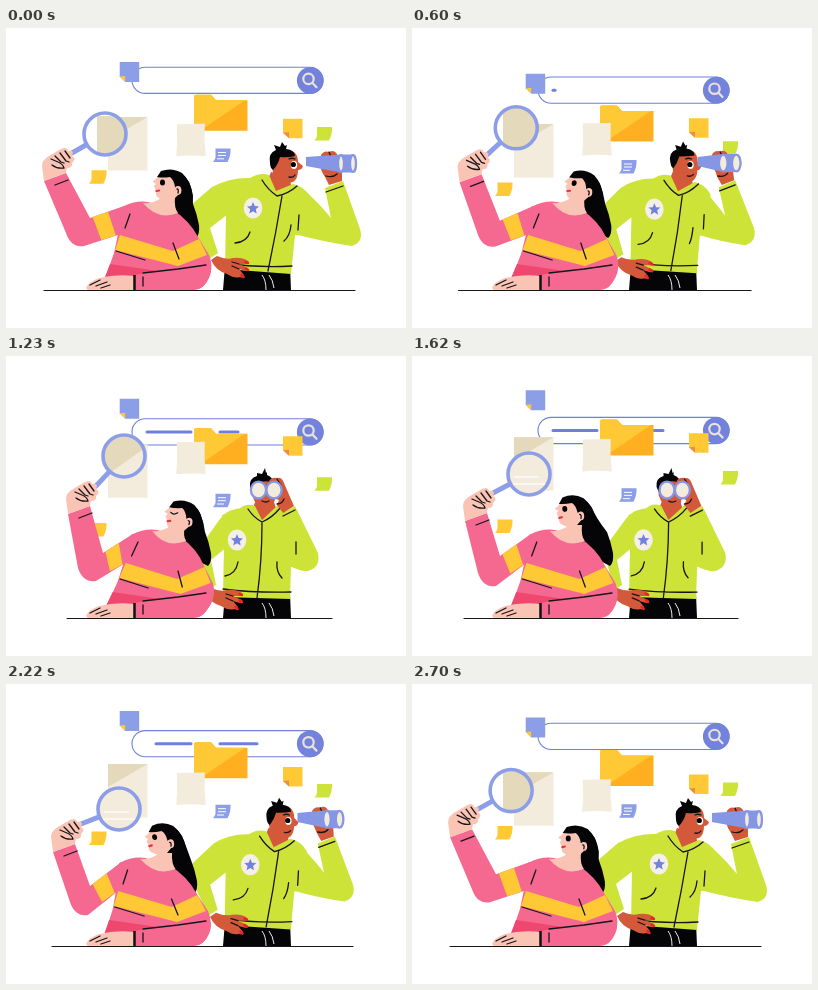
These frames come from a looping animation (400 by 300 pixels, 2730 ms). An HTML page:

```html
<!DOCTYPE html>
<html lang="en">
<head>
<meta charset="utf-8">
<title>Search together</title>
<style>
html,body{margin:0;width:100%;height:100%;overflow:hidden;background:#fff}
svg{display:block;width:100vw;height:100vh}
.ink{fill:none;stroke:#17151a;stroke-width:1.3;stroke-linecap:round;stroke-linejoin:round}
.black{fill:#050507}
.pink{fill:#f5688f}
.sun{fill:#ffc936}
.lime{fill:#cde338}
.pale{fill:#fac4b5}
.brown{fill:#d4593a}
.cream{fill:#f3ebdc}
.tan{fill:#e5d9bb}
.blue{fill:#8d9ee8}
.line{fill:none;stroke:#6f80db}
</style>
</head>
<body>
<svg viewBox="0 0 400 300">
<defs>
  <clipPath id="clip"><circle id="clipRing" r="21"/></clipPath>
  <path id="tag" d="M2.5 0H17.5Q18 7 14.5 13.5H0Q3 10 2.5 7Z"/>
</defs>

<g id="bar">
  <rect class="line" x="126" y="-13.2" width="191" height="26.2" rx="13.1" stroke-width="1.1"/>
  <path id="dash1" class="line" stroke-width="3" stroke-linecap="round"/>
  <path id="dash2" class="line" stroke-width="3" stroke-linecap="round"/>
  <circle cx="304.3" r="13.4" fill="#7383dc"/>
  <g fill="none" stroke="#e9e1dc" stroke-width="2.2" stroke-linecap="round"><circle cx="302.5" cy="-1.5" r="5.2"/><path d="M306.5 2.6L310.5 6.8"/></g>
</g>
<g id="memo"><path class="blue" d="M0 0H19.5V20H5.5L0 14.5Z"/><path class="sun" d="M0 14.5L5.5 14V20Z"/></g>
<g id="sheet"><path class="cream" d="M0 0H39.5V53.5H0Z"/><path class="tan" d="M0 0H39.5L0 23Z"/></g>
<g id="folder"><path fill="#ffaf1f" d="M0 2Q0 0 2 0H17L22 5.5H53.5V36H0Z"/><path class="sun" d="M0 2Q0 0 2 0H17L22 5.5H51L6 36H0Z"/></g>
<path id="slip" class="cream" d="M.5 .5L28.5 0Q27.5 16 29.5 32.5Q15 31 0 32.5Q1.5 16 .5 .5Z"/>
<g id="sticky"><path class="sun" d="M0 0H19.5V19.5H6L0 14Z"/><path fill="#f08a4b" d="M0 14L6 13.5V19.5Z"/></g>
<g id="tagGreen"><use href="#tag" class="lime"/></g>
<g id="tagBlue"><use href="#tag" class="blue"/><path d="M5 4H13M5 7H13M4 10.3H11" stroke="#fff" fill="none"/></g>
<g id="tagSun"><use href="#tag" class="sun"/></g>

<g id="man">
  <path class="black" d="M219 238H284L285 262H217Z"/>
  <path d="M256 247Q260 252 260 262M263 247Q267 252 268 260" stroke="#eee" fill="none"/>
  <path id="neck" class="brown"/>
  <path id="sleeve" class="lime"/>
  <path id="jacket" class="lime"/>
  <path id="arm" class="lime"/>
  <path id="seams" class="ink"/>
  <path id="face" class="brown"/>
  <path id="crop" class="black"/>
  <g id="look"><ellipse cx="288" cy="137" rx="3.2" ry="4" fill="#fff"/><circle cx="287.3" cy="136.5" r="2.6"/><path class="ink" d="M283 131Q286 129.5 289 131"/></g>
  <path id="smile" class="ink"/>
  <g id="badge"><ellipse rx="9.3" ry="10.6" fill="#f4efe9"/><path fill="#7182dc" d="M0-6L1.7-2L6-1.6L2.8 1.2L3.7 5.5L0 3.2L-3.7 5.5L-2.8 1.2L-6-1.6L-1.7-2Z"/></g>
  <path id="grip" class="brown"/>
  <path id="gripInk" class="ink"/>
  <path id="tube" fill="#8496e4"/>
  <g class="cream" stroke="#8496e4" stroke-width="2.3"><ellipse id="eyeA" ry="8.4"/><ellipse id="eyeB" ry="8.4"/></g>
  <g id="hip"><path class="brown" d="M205 232L211 228Q220 232 227 230Q236 229 242 233Q244 235 240 236L233 236L242 240Q244 243 240 243L233 241L238 247Q238 251 234 249Q229 251 221 246Q210 243 205 232Z"/><path class="ink" d="M226 234L233 236M226 238L233 241"/><path d="M239.5 234L242 235M239.5 240.5L242 242M235.5 247L237.5 249" stroke="#ef1f2d" stroke-width="2.5" stroke-linecap="round"/></g>
</g>

<g id="woman">
  <path id="hair" class="black"/>
  <path id="foreArm" class="pink"/>
  <path id="band" class="sun"/>
  <path id="cuff" class="ink"/>
  <g id="body">
    <path class="pink" d="M116 179Q130 172 142 174L166 181Q184 193 192 209L203 227Q209 242 200 254Q196 262 186 262H96L100 248L108 225L112 206Z"/>
    <path class="sun" d="M114 207L167 223L193 211L201 227L172 238L109 222Z"/>
    <path fill="#f0476f" d="M104 236L152 243L128 249L99 249Z"/>
    <path class="ink" d="M110 223L139 232M167 215L173 231M124 186L119 200"/>
    <path class="pale" d="M137 175Q148 176 156 169L169 169Q168 180 172 185Q152 193 137 175Z"/>
  </g>
  <path class="pink" d="M129 247L200 233Q208 238 203 250Q198 262 187 262H129Z"/>
  <path class="ink" d="M137 245L172 241L200 237M137 249V258"/>
  <path class="pale" d="M80 260Q82 254 93 250Q110 246 128 248V262H82Z"/>
  <path class="ink" d="M90 258L101 254M95 260L104 257M84 257L94 252"/>
  <path d="M128.5 247V262" stroke="#111" stroke-width="2.5"/>
  <g id="head">
    <path class="pale" d="M153 147L170 147L176 163L167 172Q161 175 153 170Q149 168 150 163L148 158L150 156L146.5 153.5Q151 151 153 147Z"/>
    <path class="black" d="M151 149L155 143Q166 139 176 145Q185 153 187 168L186 176Q178 174 174 167L169 159Q168 152 164 149Q157 150 151 149Z"/>
    <ellipse class="pale" cx="172" cy="162.5" rx="3.4" ry="4.4"/>
    <path class="ink" d="M171 161Q173 161 172 165"/>
    <g id="eyeOpen"><ellipse cx="156.5" cy="154.5" rx="2.5" ry="2.9"/></g>
    <path id="eyeShut" class="ink" d="M153 154Q156 157 160 154"/>
    <path d="M150.5 163L153 162.5" stroke="#e5324a" stroke-width="2.2" stroke-linecap="round"/>
  </g>
</g>

<g clip-path="url(#clip)">
  <circle id="glass" r="21" fill="#fff"/>
  <path id="zoom" class="cream"/>
  <path id="zoomTan" class="tan"/>
  <path id="zoomLine" stroke="#fff" stroke-width="1.6" fill="none"/>
</g>
<circle id="ring" r="21" fill="none" stroke="#8d9ee8" stroke-width="3.6"/>
<path id="handle" stroke="#8d9ee8" stroke-width="5" stroke-linecap="round"/>
<g id="fist">
  <path class="pale" d="M-11 4L-13-11Q-13-17-6-21L6-28Q12-31 13-26Q20-27 17-21Q22-18 17-14Q18-9 12-9Q11-6 11-4Z"/>
  <path class="ink" d="M-4-18L3-15Q8-13 9-9M0-21L6-15L9-14M5-24L11-16L14-15M10-26L15-19M-3-12Q2-8 9-9"/>
</g>
<path id="floor" class="ink" style="stroke-width:1.1"/>
</svg>
<script>
const LOOP = 2730, TIMES = [0, 390, 570, 810, 1230, 1620, 2220];
const $ = id => document.getElementById(id);
const set = (id, attrs) => { for (const k in attrs) $(id).setAttribute(k, attrs[k]); };
const path = (id, d) => set(id, { d });
const move = (id, x, y, extra = '') => set(id, { transform: `translate(${x} ${y}) ${extra}` });
const lerp = (a, b, k) => a + (b - a) * k;
const ramp = (t, a, b) => Math.min(1, Math.max(0, (t - a) / (b - a)));

// Blend two paths that share one structure.
function mix(a, b, k) {
  const nums = b.match(/-?[\d.]+/g);
  let i = 0;
  return a.replace(/-?[\d.]+/g, n => lerp(+n, +nums[i++], k).toFixed(2));
}

// Cyclic monotone cubic through the pose values.
function pose(t, v) {
  const n = v.length, at = i => TIMES[(i + n) % n] + LOOP * Math.floor(i / n);
  const slope = i => (v[(i + 1 + n) % n] - v[(i + n) % n]) / (at(i + 1) - at(i));
  const tan = i => {
    const a = slope(i - 1), b = slope(i);
    return a * b <= 0 ? 0 : 2 * a * b / (a + b);
  };
  let i = n - 1;
  while (TIMES[i] > t) i--;
  const h = at(i + 1) - at(i), s = (t - at(i)) / h, r = 1 - s;
  return v[i] * r * r * (1 + 2 * s) + tan(i) * h * s * r * r
    + v[(i + 1) % n] * s * s * (3 - 2 * s) - tan(i + 1) * h * s * s * r;
}

function drawPapers(t) {
  const wave = (mid, amp, phase) => mid + amp * Math.cos(2 * Math.PI * (t / LOOP - phase));
  move('bar', 0, wave(64.5, 12.1, .5));
  move('memo', 113.7, wave(37, 10, .297));
  move('sheet', 102, wave(87.3, 8.8, .22));
  move('slip', 170.3, wave(90, 7, .1));
  move('folder', 188, wave(68, 10, .27));
  move('sticky', 277, wave(84.7, 7.5, .1));
  move('tagGreen', 308.5, wave(109.5, 12, .42));
  move('tagBlue', 207, wave(128.5, 9.5, .41));
  move('tagSun', 83, wave(154.5, 12.5, .47));
  const dash = (id, x, w, on, off) => {
    const a = x + w * ramp(t, ...off), b = x + w * ramp(t, ...on);
    path(id, b - a > .5 ? `M${a + 1} 0H${b}` : 'M0 0');
  };
  dash('dash1', 140, 45, [570, 1020], [2130, 2580]);
  dash('dash2', 213, 38, [1050, 1410], [2340, 2640]);
}

function drawMan(t) {
  const m = pose(t, [0, .09, .24, .77, 1, .97, .17]);
  const morph = (id, a, b) => path(id, mix(a, b, m));
  morph('neck', 'M265 144L284 150L286 164L270 170L260 156Z', 'M250 144L268 146L272 158L256 168L246 154Z');
  morph('sleeve', 'M246 150Q224 149 206 159L184 178Q179 186 184 195L203 231L212 225L204 200L222 186Z',
    'M238 152Q222 152 214 163L196 188Q191 196 195 206L202 234L210 229L205 204L222 190Z');
  morph('jacket', 'M244 150Q254 144 263 147L270 163L287 156Q297 158 304 168L300 206L289 207L285 246L219 241L220 186L222 155Z',
    'M232 154Q240 146 249 150L256 164L272 149Q280 150 285 162L290 208L285 210L284 243L217 241L218 190L216 159Z');
  morph('arm', 'M288 157Q300 160 325 190L319 160L337 153L354 201Q358 214 346 218Q318 214 284 205Z',
    'M274 154Q279 166 284 182L276 157L289 150L312 197Q315 211 302 215Q294 216 280 208Z');
  morph('seams', 'M256 152Q262 162 271 168Q282 166 291 158M276 168Q270 205 262 243M219 235Q250 240 286 238M229 215Q241 214 244 204M278 213Q284 208 285 197M320 164L337 158M293 187L292 202',
    'M242 153Q248 162 256 166Q266 162 275 151M256 167Q256 205 251 242M217 233Q250 237 285 236M219 220Q230 218 232 206M276 222Q270 216 271 206M277 160L289 154M290 186L290 198');
  morph('face', 'M266 129L288 124Q292 127 292 134L297 138Q296 142 292 142Q292 151 287 154Q276 157 267 147Z',
    'M246 126L266 122Q270 127 270 134L270 139Q270 142 269 143Q268 150 261 153Q250 152 246 139Z');
  morph('crop', 'M264 135Q262 125 270 122L268 117L274 119L276 114L279 118L281 117L280 121Q289 122 289 128Q281 130 274 129Q272 137 267 142Q264 140 264 135Z',
    'M244 131Q243 122 251 120L251 117L256 118L259 112L260 117L261 116L261 119Q267 121 266 126Q258 124 251 127Q249 130 247 137Q245 134 244 131Z');
  morph('smile', 'M283 149Q287 150 289 147', 'M256 145Q260 147 263 145');
  move('look', lerp(0, -33, m), 0);
  set('look', { opacity: m > .85 ? 0 : 1 });
  move('badge', lerp(247, 231, m), lerp(180, 184, m));
  move('hip', -6 * m, 4 * m);

  morph('grip', 'M315 127Q318 122 323 124Q328 121 331 126L336 144L336 153L323 157L319 149L316 144L314 138Z',
    'M263 125Q266 121 271 122Q276 121 278 127L284 141L288 150L277 157L271 149L273 144L270 143Z');
  morph('gripInk', 'M320 148Q327 150 331 146M323 124L325 129', 'M271 148Q276 148 278 143M271 123L275 129');
  const ax = lerp(335, 252.5, m), bx = lerp(347, 268, m), y = lerp(135.5, 134, m);
  const ex = lerp(300, 250, m);
  path('tube', ex < ax && m < .95 ? `M${ex} 129L${ax} ${y - 9}H${bx}V${y + 9}H${ax}L${ex} 138Z` : 'M0 0');
  const rx = lerp(3, 7.6, m);
  set('eyeA', { cx: ax, cy: y, rx });
  set('eyeB', { cx: bx, cy: y, rx });
}

function drawWoman(t) {
  const p = (...v) => pose(t, v);
  const lean = p(0, .05, .3, .85, 1, .1, -.3) * 9 / 85;
  const skew = (x, y) => [x + lean * (262 - y), y];
  set('body', { transform: `matrix(1 0 ${-lean} 1 ${lean * 262} 0)` });

  const hx = p(0, 1, 4, 10, 11, -3, -7), hy = p(0, 0, 1, 2, 3, -2, -2);
  move('head', hx, hy, `rotate(${p(0, 4, 5, 6, 4, -4, -5)} 163 165)`);
  const shut = t > 1080 && t < 1380;
  set('eyeOpen', { opacity: shut ? 0 : 1 });
  set('eyeShut', { opacity: shut ? 1 : 0 });
  const tail = p(0, 5, 6, 8, 12, 8, -2);
  path('hair', `M${164 + hx} ${146 + hy}Q${176 + hx} ${142 + hy} ${183 + hx} ${154 + hy}Q${187 + hx} ${164 + hy} ${187 + tail} 176Q${191 + tail} 186 ${193 + tail} 197Q${194 + tail} 206 ${190 + tail} 210Q${178 + tail} 205 ${165 + tail} 190L${166 + hx} 170Z`);

  const cx = p(49, 51, 57, 71, 73, 64, 58), cy = p(149, 149, 150, 153, 154, 161, 164);
  const px = p(72, 75, 77, 82, 84, 78, 76), py = p(219, 217, 219, 224, 226, 231, 232);
  const kx = p(84, 83, 87, 95, 97, 88, 84), ky = p(190, 188, 192, 198, 197, 200, 202);
  const top = skew(118, 178), under = skew(115, 206);
  path('foreArm', `M${cx - 11} ${cy + 4}L${cx + 11} ${cy - 4}L${kx} ${ky}L${top}L${under}L${px + 6} ${py - 1}Q${px - 7} ${py + 1} ${px - 12} ${py - 14}Z`);
  const on = (x, y, q, k) => [lerp(x, q[0], k), lerp(y, q[1], k)];
  path('band', `M${on(kx, ky, top, .08)}L${on(kx, ky, top, .53)}L${on(px, py, under, .88)}L${on(px, py, under, .54)}Z`);
  path('cuff', `M${cx} ${cy + 8}L${cx + 13} ${cy + 3}`);
  move('fist', cx, cy);

  const x = p(99, 99, 103, 116, 118, 117, 113), y = p(106, 102, 100, 99, 100, 118, 125);
  for (const id of ['clipRing', 'glass', 'ring']) set(id, { cx: x, cy: y });
  const gx = cx + 17, gy = cy - 24, d = Math.hypot(x - gx, y - gy), k = (d - 22) / d;
  path('handle', `M${gx} ${gy}L${lerp(gx, x, k)} ${lerp(gy, y, k)}`);
  const edge = p(88, 82, 76, 70, 64, 62, 70), q = p(190, 190, 185, 178, 126, 95, 100);
  path('zoom', `M91 ${edge}H180V190H91Z`);
  path('zoomTan', `M91 ${edge}V${q}L180 ${q - 63}V${edge}Z`);
  path('zoomLine', `M${x - 16} ${y + 10}H${x + 17}M${x - 15} ${y + 3}H${x + 10}`);
  set('zoomLine', { opacity: p(0, 0, 0, 0, 0, .8, .8) });
  path('floor', `M${p(38, 38, 45, 58, 61, 52, 46)} 262.5H${p(349, 349, 341, 326, 326, 326, 347)}`);
}

function draw(now) {
  const t = Math.floor((now % LOOP) / 30) * 30;
  drawPapers(t);
  drawMan(t);
  drawWoman(t);
}

let start;
function tick(now) {
  start ??= now;
  draw(now - start);
  requestAnimationFrame(tick);
}
draw(0);
requestAnimationFrame(tick);
</script>
</body>
</html>
```
